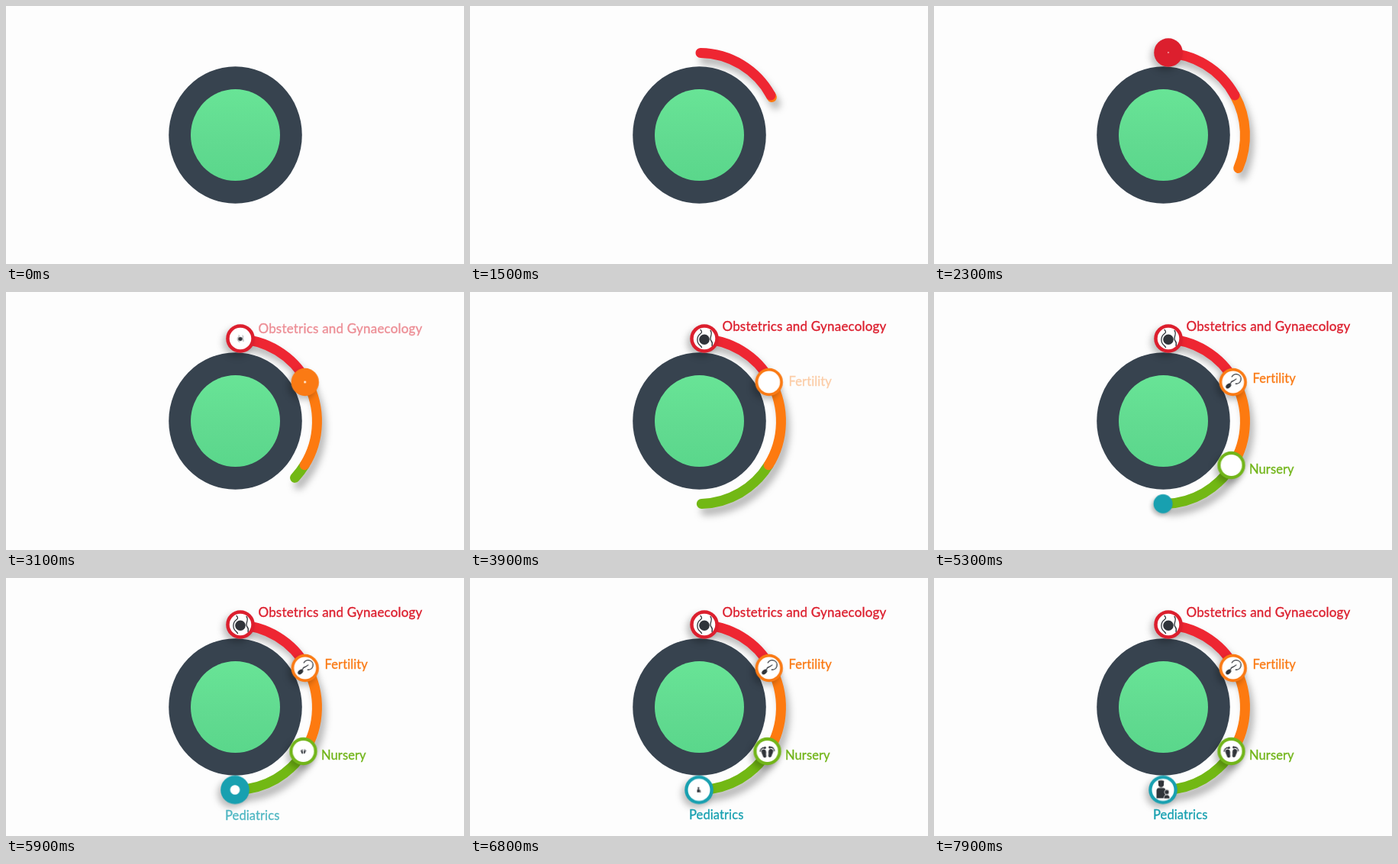
Recreate the animation shown at these times as an HTML page. Size 600 by 338 pixels, loop 8 s.

```html
<!DOCTYPE html>
<html lang="en">
<head>
<meta charset="utf-8">
<title>Women and children care</title>
<style>
html, body { margin: 0; width: 100%; height: 100%; overflow: hidden; background: #fdfdfd; }
svg { display: block; width: 100vw; height: 100vh; }

.arc, .ring, .disc, .glyph, text { animation: 8s ease-in-out infinite both; }

.arcs { fill: none; stroke-width: 13; stroke-linecap: round; filter: drop-shadow(5px 9px 5px rgba(0,0,0,.27)); }
.arc { stroke-dasharray: 1 3; }
.ring > circle { filter: drop-shadow(-4px 5px 4px rgba(0,0,0,.25)); }
.disc { fill: #fff; }
.glyph { fill: #30343a; stroke: #30343a; stroke-width: 0; stroke-linecap: round; }
.line { fill: none; stroke-width: 1.3; }
text { font: 16.5px Lato, "Open Sans", sans-serif; letter-spacing: .1px; stroke-width: .35; }

.red { --c: #dc1f2e; }
.orange { --c: #fa7a14; }
.green { --c: #72b51a; }
.teal { --c: #18a0b0; }
.ring { fill: var(--c); }
text { fill: var(--c); stroke: var(--c); }

/* Arcs are drawn one after another */
@keyframes arc1 { 0%, 3.75% { stroke-dashoffset: 1.02 } 18.75%, 100% { stroke-dashoffset: 0 } }
@keyframes arc2 { 0%, 16.25% { stroke-dashoffset: 1.02 } 33.1%, 100% { stroke-dashoffset: 0 } }
@keyframes arc3 { 0%, 33.75% { stroke-dashoffset: 1.02 } 49.4%, 100% { stroke-dashoffset: 0 } }

/* Badges pop up */
@keyframes ring1 { 0%, 20.6% { transform: scale(0) } 26.9%, 100% { transform: none } }
@keyframes ring2 { 0%, 31.3% { transform: scale(0) } 37.5%, 100% { transform: none } }
@keyframes ring3 { 0%, 48.8% { transform: scale(0) } 55%, 100% { transform: none } }
@keyframes ring4 { 0%, 62.5% { transform: scale(0) } 68.8%, 100% { transform: none } }

/* White centres open */
@keyframes disc1 { 0%, 27.5% { transform: scale(0) } 35%, 100% { transform: none } }
@keyframes disc2 { 0%, 36.9% { transform: scale(0) } 45.6%, 100% { transform: none } }
@keyframes disc3 { 0%, 55.3% { transform: scale(0) } 62.8%, 100% { transform: none } }
@keyframes disc4 { 0%, 70.3% { transform: scale(0) } 77.8%, 100% { transform: none } }

/* Pictograms grow */
@keyframes glyph1 { 0%, 34.4% { transform: scale(0) } 44.4%, 100% { transform: none } }
@keyframes glyph2 { 0%, 53.8% { transform: scale(0) } 63.1%, 100% { transform: none } }
@keyframes glyph3 { 0%, 69.4% { transform: scale(0) } 79.4%, 100% { transform: none } }
@keyframes glyph4 { 0%, 81.3% { transform: scale(0) } 91.3%, 100% { transform: none } }

/* Labels fade in while rising */
@keyframes label1 { 0%, 35% { opacity: 0; transform: translateY(6px) } 42.5%, 100% { opacity: 1; transform: none } }
@keyframes label2 { 0%, 45.6% { opacity: 0; transform: translateY(6px) } 53.1%, 100% { opacity: 1; transform: none } }
@keyframes label3 { 0%, 55.4% { opacity: 0; transform: translateY(6px) } 62.9%, 100% { opacity: 1; transform: none } }
@keyframes label4 { 0%, 68.8% { opacity: 0; transform: translateY(6px) } 76.3%, 100% { opacity: 1; transform: none } }
</style>
</head>
<body>
<svg viewBox="0 0 600 338" preserveAspectRatio="none">
  <defs>
    <linearGradient id="mint" x2="0" y2="1">
      <stop offset="0" stop-color="#68e496"/>
      <stop offset=".6" stop-color="#61da90"/>
      <stop offset="1" stop-color="#5ad78b"/>
    </linearGradient>
    <g id="foot">
      <path d="M-2.8-1.8C-2.4-4.8 2.6-4.8 3.2-1.6C3.6 1 2.2 2.2 2.2 4.4C2.2 8-2 8-2.2 4.6C-2.3 2.2-3.1.6-2.8-1.8Z"/>
      <circle cx="2.8" cy="-5.6" r="1.6"/>
      <circle cx=".3" cy="-6.2" r="1.1"/>
      <circle cx="-1.7" cy="-5.5" r="1"/>
      <circle cx="-3.2" cy="-4.3" r=".9"/>
      <circle cx="-4.1" cy="-2.8" r=".8"/>
    </g>
  </defs>

  <g class="arcs">
    <path class="arc" pathLength="1" stroke="#72b814" style="animation-name:arc3" d="M391.2 226.7A107 108 0 0 1 303 277.5"/>
    <path class="arc" pathLength="1" stroke="#fd7a10" style="animation-name:arc2" d="M394 117A107 108 0 0 1 391.2 226.7"/>
    <path class="arc" pathLength="1" stroke="#ee2632" style="animation-name:arc1" d="M302 61.5A107 108 0 0 1 394 117"/>
  </g>

  <ellipse cx="300.5" cy="169" rx="87.3" ry="89.8" fill="#37434f"/>
  <ellipse cx="300.5" cy="169" rx="58.5" ry="60" fill="url(#mint)"/>

  <g class="red" transform="translate(307 61)">
    <g class="ring" style="animation-name:ring1"><circle r="18.8"/></g>
    <circle class="disc" r="14.3" style="animation-name:disc1"/>
    <g class="glyph" style="animation-name:glyph1">
      <circle cy="1.2" r="6.8"/>
      <path class="line" d="M-5-11.5C-3-9.5-3-8-5-6.5C-10.5-2.5-10.5 5.5-5 9.5L-3.5 11.5M8-10.5C12-6 5.5-1 9 3C11 5.5 10.5 8 10 9.5"/>
    </g>
  </g>

  <g class="orange" transform="translate(391.7 118)">
    <g class="ring" style="animation-name:ring2"><circle r="18.2"/></g>
    <circle class="disc" r="14.4" style="animation-name:disc2"/>
    <g class="glyph" style="animation-name:glyph2">
      <path class="line" d="M-1.5-7A6.3 6.3 0 1 1 3.5 2.2M-5 4C-2 2-4-1 0-1.5C2-1.8 2.5-3.5 4-4"/>
      <ellipse cx="-6" cy="5" rx="4" ry="2.7" transform="rotate(-42 -6 5)"/>
    </g>
  </g>

  <g class="green" transform="translate(389.5 227)">
    <g class="ring" style="animation-name:ring3"><circle r="18.2"/></g>
    <circle class="disc" r="14" style="animation-name:disc3"/>
    <g class="glyph" style="animation-name:glyph3">
      <use href="#foot" transform="translate(-4.6 1.6) rotate(-14)"/>
      <use href="#foot" transform="translate(4.6 1) rotate(14) scale(-1 1)"/>
    </g>
  </g>

  <g class="teal" transform="translate(300 277.5)">
    <g class="ring" style="animation-name:ring4"><circle r="18.8"/></g>
    <circle class="disc" r="14.5" style="animation-name:disc4"/>
    <g class="glyph" style="animation-name:glyph4">
      <path d="M-6.5-11.5Q-2.5-13.5 1.5-11.5L1-8.5V-5.5Q-2.5-1-6-5.5V-8.5Z"/>
      <path d="M-8.5 11V1Q-8.5-2.5-5-2.5H0Q3.5-2.5 4 2L2 11Z"/>
      <circle cx="5" cy="3" r="3.2" stroke="#fff" stroke-width=".7"/>
      <path d="M1 11.5Q1 6.5 5 6.5T9 11.5Z" stroke="#fff" stroke-width=".7"/>
    </g>
  </g>

  <text class="red" x="330.5" y="51" style="animation-name:label1;font-size:17px;letter-spacing:.2px">Obstetrics and Gynaecology</text>
  <text class="orange" x="417.5" y="119" style="animation-name:label2">Fertility</text>
  <text class="green" x="413" y="237.5" style="animation-name:label3">Nursery</text>
  <text class="teal" x="287" y="316" style="animation-name:label4">Pediatrics</text>
</svg>
</body>
</html>
```
